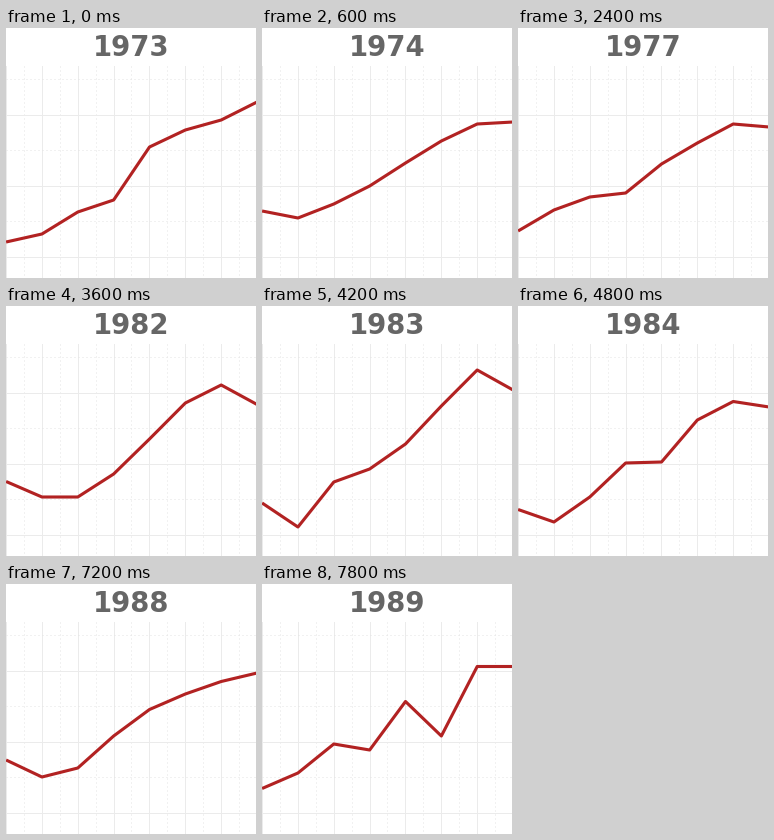
A matplotlib script that plays this animation: 250 by 250 pixels, repeating every 8000 ms.

```python
import numpy as np
import matplotlib.pyplot as plt
from matplotlib.animation import FuncAnimation

SIZE = 250
DPI = 100
PX = 72 / DPI          # one pixel in points
MONTH = 35.85          # pixels between months
TOP = 38               # upper edge of the panel

# Height of the curve in pixels from the top, one value per month.
CURVES = {
    1973: [214, 206, 184, 172, 119, 102, 92, 74],
    1974: [183, 190, 176, 158, 135, 113, 96, 94],
    1975: [186, 182, 197, 164, 135, 104, 84, 82],
    1976: [211, 190, 187, 161, 126, 91, 84, 97.5],
    1977: [203, 182, 169, 165, 136, 115, 96, 99],
    1981: [194, 194, 164, 156, 132, 104, 94, 86],
    1982: [175.5, 191, 191, 168, 133, 97, 79, 98.5],
    1983: [197, 221, 176, 163, 138, 100, 64, 84],
    1984: [203.5, 216, 191, 157, 156, 114, 95.5, 101],
    1985: [242, 196, 190, 154, 134, 108, 82, 92],
    1986: [200, 205, 185, 177.5, 122, 95, 85, 97.5],
    1987: [262, 207, 199, 150, 142, 115, 86, 84],
    1988: [176, 193, 184, 152, 125.5, 110, 97.5, 89],
    1989: [204.5, 189, 160, 166, 117.5, 152, 82.5, 82.5],
}
YEARS = list(CURVES)
INTERVAL = 200
HOLD = 3               # frames per year
FRAMES = 40

fig = plt.figure(figsize=(SIZE / DPI, SIZE / DPI), dpi=DPI, facecolor="white")
ax = fig.add_axes([0, 0, 1, 1])
ax.set_xlim(0, SIZE)
ax.set_ylim(SIZE, 0)
ax.axis("off")


def grid_line(xs, ys, minor):
    style = (0, (1, 3)) if minor else "-"
    color = "#e4e4e4" if minor else "#ebebeb"
    ax.plot(xs, ys, color=color, lw=PX, ls=style, dash_capstyle="butt", zorder=1)


for i in range(14):
    x = i * MONTH / 2
    grid_line([x, x], [TOP, SIZE], minor=i % 2 == 1)
for i in range(6):
    y = 51 + i * 35.5
    grid_line([0, SIZE], [y, y], minor=i % 2 == 0)

months = 0.1 + MONTH * np.arange(8)
curve, = ax.plot([], [], color="#b22222", lw=3.1 * PX, solid_joinstyle="round",
                 solid_capstyle="butt", zorder=3)
title = ax.text(SIZE / 2, 28, "", ha="center", va="baseline", color="#666666",
                family="DejaVu Sans", weight="bold", size=27.5 * PX)


def update(frame):
    year = YEARS[frame // HOLD]
    curve.set_data(months, CURVES[year])
    title.set_text(str(year))
    return curve, title


anim = FuncAnimation(fig, update, frames=FRAMES, interval=INTERVAL,
                     repeat=True, repeat_delay=0, blit=False)
plt.show()
```
